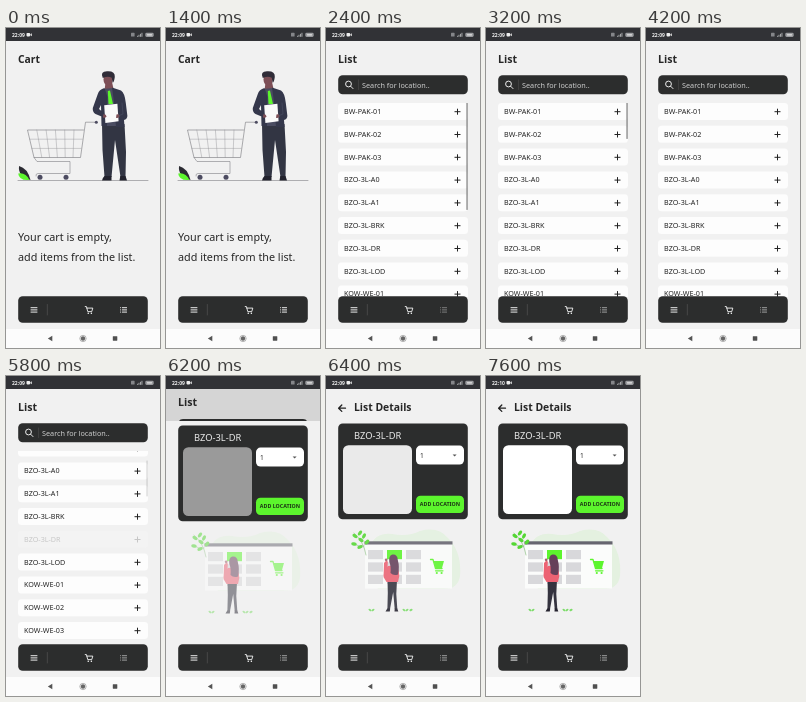
Write an HTML page that moves like this. It is 154 by 320 pixels and loops after 8000 ms.

```html
<!DOCTYPE html>
<html lang="en">
<head>
<meta charset="utf-8">
<title>Cart and list</title>
<style>
html, body { margin: 0; width: 100%; height: 100%; overflow: hidden; background: #f1f1f1; }
svg { display: block; width: 154px; height: 320px; font-family: "Noto Sans", sans-serif; }
</style>
</head>
<body>
<svg id="stage" viewBox="0 0 154 320" xmlns="http://www.w3.org/2000/svg"></svg>
<script>
const INK = '#2c2d2d', NAVY = '#34374b', GREEN = '#5cf52d', PAPER = '#f1f1f1', SKIN = '#7d4f57';
const LOOP = 8000, STEP = 200;
const PITCH = 22.8, LIST_TOP = 75;

const rect = (x, y, w, h, fill, r = 0, more = '') =>
  `<rect x="${x}" y="${y}" width="${w}" height="${h}" rx="${r}" fill="${fill}" ${more}/>`;
const path = (d, fill, more = '') => `<path d="${d}" fill="${fill}" ${more}/>`;
const line = (d, color, w = 0.6, more = '') =>
  `<path d="${d}" fill="none" stroke="${color}" stroke-width="${w}" stroke-linecap="round" stroke-linejoin="round" ${more}/>`;
const dot = (x, y, r, fill) => `<circle cx="${x}" cy="${y}" r="${r}" fill="${fill}"/>`;
const leaf = (x, y, a, fill = GREEN, s = 1) =>
  `<ellipse cx="${x}" cy="${y}" rx="${2.8 * s}" ry="${1.7 * s}" fill="${fill}" transform="rotate(${a} ${x} ${y})"/>`;
const text = (x, y, size, str, fill = '#262626', weight = 400, more = '') =>
  `<text x="${x}" y="${y}" font-size="${size}" fill="${fill}" font-weight="${weight}" ${more}>${str}</text>`;
const group = (id, body, more = '') => `<g id="${id}" ${more}>${body}</g>`;

function cartIcon(x, y, s, color) {
  return `<g transform="translate(${x} ${y}) scale(${s})">` +
    line('M-4 -3.6H-2.7L-1.3 1.7H2.9L4 -2H-2.2', color, 0.9) +
    dot(-0.8, 3.4, 0.8, color) + dot(2.5, 3.4, 0.8, color) + '</g>';
}

function statusBar() {
  let s = rect(0, 0, 154, 13, '#313236') +
    text(6, 8.6, 5, '22:09', '#f2f2f2', 600, 'id="clock"') +
    rect(20.5, 5, 3.6, 3.4, '#eee', 0.8) + path('M24.4 6.2L25.8 5.2V8.3L24.4 7.3Z', '#eee') +
    rect(125, 4.8, 3.6, 3.8, '#85868a', 0.6);
  for (let i = 0; i < 4; i++) s += rect(131 + i * 1.5, 7.8 - i, 0.9, 1 + i, '#b5b6b8');
  return s + rect(139.3, 4.7, 8.4, 4.2, '#9a9b9e', 1.4) + rect(141, 6.2, 5, 1.2, '#e4e4e4', 0.4);
}

function tabBar() {
  let s = rect(12.2, 268.2, 129.6, 26.6, INK, 4.5), rows = '';
  for (let i = 0; i < 3; i++) {
    const y = 279.7 + i * 2.2;
    s += line(`M25 ${y}H31`, '#fff', 0.9);
    rows += line(`M114.4 ${y}H114.5M116.3 ${y}H120.6`, '#fff', 0.9);
  }
  return s + line('M41.3 276.5V287', '#5c5c5c', 0.6) + cartIcon(83, 282, 0.95, '#fff') + group('listIcon', rows);
}

function navBar() {
  return rect(0, 301, 154, 19, '#fcfcfc') +
    path('M46.3 307.8V313.2L41.8 310.5Z', '#555') +
    dot(77, 310.5, 2.2, '#666') +
    `<circle cx="77" cy="310.5" r="3.2" fill="none" stroke="#888" stroke-width=".6"/>` +
    rect(106.8, 308.2, 4.5, 4.5, '#505050', 0.4);
}

function trolley() {
  let s = line('M91 94.2H79.5L74.5 129.5H28L21.5 102H77.5', '#77777d', 0.6);
  for (let i = 1; i < 6; i++) s += line(`M${21.5 + i * 9.3} 102L${28 + i * 7.8} 129.5`, '#939398', 0.45);
  for (let i = 1; i < 3; i++) s += line(`M${21.5 + i * 2.2} ${102 + i * 9.2}H${77.5 - i * 1.2}`, '#939398', 0.45);
  s += line('M28 129.5L31 133.5H64V145.5H32Q29.5 145.5 30 148', '#77777d', 0.55);
  return s + dot(34, 149.2, 2.5, '#4c4b60') + dot(60, 149.2, 2.5, '#4c4b60') + dot(90.3, 94.2, 1.5, '#4c4b60');
}

function shopper() {
  return path('M96 96H118.5L120 124L119.5 149H114.5L109 112L105.5 149H98.5L96.5 122Z', '#323543') +
    path('M98.5 148H105.5V152.5H96Q96.5 149.5 98.5 148ZM114.3 148H119.5L121 152.5H113.5Z', '#22222d') +
    path('M99.5 54H106L108 63H98.5Z', SKIN) +
    path('M97 61L107 60L112 70V98H97Z', '#4a4c61') +
    path('M101.8 63L104 62.5L107 76H102.5Z', GREEN) +
    path('M98.5 60Q93 61.5 91.8 66L86.8 80Q86.4 84 89.5 86L98 89.5L99 86L93 81L95 77L95.5 98H101L101.5 69Z', NAVY) +
    path('M106 59.5L115 62.5Q118.8 65 119.8 75L121.4 88Q121 91.5 118 92L118.5 99H110L108 74Z', NAVY) +
    line('M116 75L117 86L112 88', '#51546a', 0.5) +
    path('M98.2 77.3L111.4 75.8L112.6 93.3L99.4 95Z', '#fafafa') +
    path('M97.3 86.3Q100 86 100.6 88.4Q99.5 90.3 97 89.5Z', SKIN) +
    path('M110.5 86.5Q113 85.5 113.6 88.3Q112.5 90.5 110 89.7Z', SKIN) +
    `<ellipse cx="102" cy="51.6" rx="4.5" ry="5.9" fill="${SKIN}"/>` +
    path('M96.8 50Q93.8 43.6 101 43.3Q109.3 42.8 108.8 49Q108.2 54 106.6 54.8L105.8 49.8Q102 47.5 96.8 50Z', '#302c38');
}

function cartScreen() {
  return text(12, 34.8, 10.3, 'Cart', '#262626', 600) +
    line('M12 152.5H142', '#77777d', 0.55) +
    path('M24.5 152Q12 149 13 138Q21.5 140 24.5 152Z', '#2b2b32') +
    path('M23.5 152Q13 153 12.2 145.5Q19.5 144 23.5 152Z', GREEN) +
    trolley() + shopper() +
    text(12, 213.1, 10.8, 'Your cart is empty,') +
    text(12, 233.4, 10.8, 'add items from the list.');
}

function listScreen() {
  const names = ['BW-PAK-01', 'BW-PAK-02', 'BW-PAK-03', 'BZO-3L-A0', 'BZO-3L-A1', 'BZO-3L-BRK',
    'BZO-3L-DR', 'BZO-3L-LOD', 'KOW-WE-01', 'KOW-WE-02', 'KOW-WE-03', 'KOW-WE-04'];
  const rows = names.map((name, i) => {
    const y = LIST_TOP + i * PITCH;
    return group('row' + i, rect(12, y, 130, 17, '#fdfdfd', 3.5) + text(18, y + 11, 7.2, name) +
      line(`M128.9 ${y + 8.7}H134.1M131.5 ${y + 6.1}V${y + 11.3}`, '#222', 1));
  }).join('');
  return text(12, 34.8, 10.6, 'List', '#262626', 600) +
    rect(12.2, 47.2, 129.6, 19, INK, 4.5) +
    `<circle cx="22.5" cy="56" r="2.9" fill="none" stroke="#fff" stroke-width=".9"/>` +
    line('M24.7 58.3L27 60.6', '#fff', 0.9) + line('M32.6 52V61.5', '#595959', 0.5) +
    text(36, 59.6, 7.25, 'Search for location..', '#cfcfcf') +
    `<g clip-path="url(#listClip)">${group('rows', rows)}</g>` +
    rect(140.4, LIST_TOP, 1.3, 36, '#858585', 0.4, 'id="thumb"');
}

function foliage() {
  let s = line('M40 179Q38 166 28 157M38 170Q33 171 28 168', '#62a757', 0.5);
  for (const [x, y, a] of [[34, 157, -50], [29, 160, 30], [38, 160, -60], [35, 164, 30], [28, 168, 10], [41, 166, -45], [34, 171, -20]])
    s += leaf(x, y, a, '#54d734');
  for (const [x, a] of [[44, 35], [47, -35], [78, 35], [81, -35], [85, -20]])
    s += leaf(x, 234, a, '#7cdc68', 0.6);
  return s;
}

function shopWindow() {
  let s = path('M44 170Q50 156 66 158Q82 161 94 155Q112 150 122 162Q136 176 134 200Q132 213 118 213H52Q40 196 44 170Z', '#e4f1e0') +
    rect(39, 166.5, 87, 46, '#fbfcfb') + rect(38.5, 165.3, 88, 3.2, '#66656f');
  for (let r = 0; r < 3; r++)
    for (let c = 0; c < 3; c++)
      s += rect(42 + c * 19, 174 + r * 12.4, 15, 9.2, r === 0 && c === 1 ? GREEN : '#d8d8db');
  s += line('M104.5 183.5H107L109.5 192.5H116', GREEN, 1.3) +
    path('M107.5 185H118L116 192H109.5Z', GREEN) + line('M109.5 194.8H117', GREEN, 1.2) +
    dot(110.8, 197, 1.1, GREEN) + dot(115.6, 197, 1.1, GREEN) + foliage();
  s += path('M61.5 204H71L70.3 218L71.3 233H68.7L67.2 216L64 233H61.4L61.8 217Z', '#34333f') +
    path('M61.3 232.5H64.2L63.8 235.5H59.5ZM68.7 232.5H71.3L72.3 235.5H68.5Z', '#25232f') +
    path('M62 190L69.5 189.5Q73 192 73.3 200L72 206H60.5L57.5 201Q58 193 62 190Z', '#ec6273') +
    path('M57.6 200L58 187L60.8 184L61.8 186L61 198Z', '#ec6273') +
    dot(60.2, 183.8, 1.4, '#a0616a');
  return s + path('M66.5 178.5Q71.5 178 71.8 184Q73.8 191 72 198.5Q67.5 200 64.5 197Q65.2 190 63.3 186Q62.4 179.5 66.5 178.5Z', '#65405a');
}

function detailScreen() {
  return rect(12.2, 47.5, 129.6, 95.8, INK, 4.5) +
    text(28, 62.6, 9.3, 'BZO-3L-DR', '#ececec') +
    rect(17, 69.2, 69, 68.8, '#fff', 5.5, 'id="codeBox"') +
    rect(90, 69.6, 48, 19, '#fff', 4.5) + text(94, 81.6, 6.6, '1') +
    path('M126.6 78.4H130.6L128.6 80.5Z', '#555') +
    rect(90, 119.8, 48, 17.2, GREEN, 4.5) +
    text(114, 130.3, 5.3, 'ADD LOCATION', '#1c3215', 600, 'text-anchor="middle"') +
    group('shop', shopWindow());
}

const stage = document.getElementById('stage');
stage.innerHTML =
  '<defs><clipPath id="listClip"><rect x="0" y="75" width="154" height="194"/></clipPath></defs>' +
  rect(0, 0, 154, 320, PAPER) +
  group('cart', cartScreen()) +
  group('list', listScreen()) +
  group('veil', rect(0, 13, 154, 32, '#d5d5d5') + text(12, 29.5, 10.6, 'List', '#262626', 600) +
    path('M13 45Q14 43 17 43H137Q140 43 141 45Z', INK)) +
  group('details', detailScreen()) +
  group('heading', line('M19.5 32.2H12.8M15.8 29L12.6 32.2L15.8 35.4', '#222', 1.3) +
    text(28, 34.9, 10.4, 'List Details', '#262626', 600)) +
  tabBar() + navBar() + statusBar();

const el = id => document.getElementById(id);
const show = (id, on) => el(id).setAttribute('display', on ? 'inline' : 'none');
const fade = (id, a) => el(id).setAttribute('opacity', a);
const shift = (id, y) => el(id).setAttribute('transform', `translate(0 ${y})`);

// Drag that slows to a stop
function scrollAt(t) {
  const p = Math.min(1, Math.max(0, (t - 4400) / 800));
  return 57 * Math.min(1, 1.37 * p - 0.37 * p ** 3);
}

function render(t) {
  const details = t >= 6200, entering = details && t < 6400;
  show('cart', t < 2400);
  show('list', t >= 2400 && !details);
  show('veil', entering);
  show('details', details);
  show('heading', t >= 6400);
  fade('listIcon', t < 2200 ? 1 : t < 2600 ? 0.42 : 0.6);

  const y = scrollAt(t);
  shift('rows', -y);
  fade('row6', t >= 5800 ? 0.2 : 1);
  const size = t < 2800 ? 107 : t < 3000 ? 71 : t < 3200 ? 53.5 : 36;
  el('thumb').setAttribute('height', size);
  shift('thumb', y * 0.165);
  fade('thumb', t < 4000 ? 1 : t < 4200 ? 0.5 : t < 4600 ? 0 : t < 5800 ? 1 : 0.3);

  shift('details', entering ? 2 : 0);
  fade('codeBox', entering ? 0.52 : t < 6600 ? 0.9 : 1);
  fade('shop', entering ? 0.5 : t < 6600 ? 0.88 : 1);
  el('clock').textContent = t < 7600 ? '22:09' : '22:10';
}

const start = performance.now();
function tick() {
  const t = (performance.now() - start) % LOOP;
  render(Math.floor(t / STEP) * STEP);
  requestAnimationFrame(tick);
}
tick();
</script>
</body>
</html>
```
